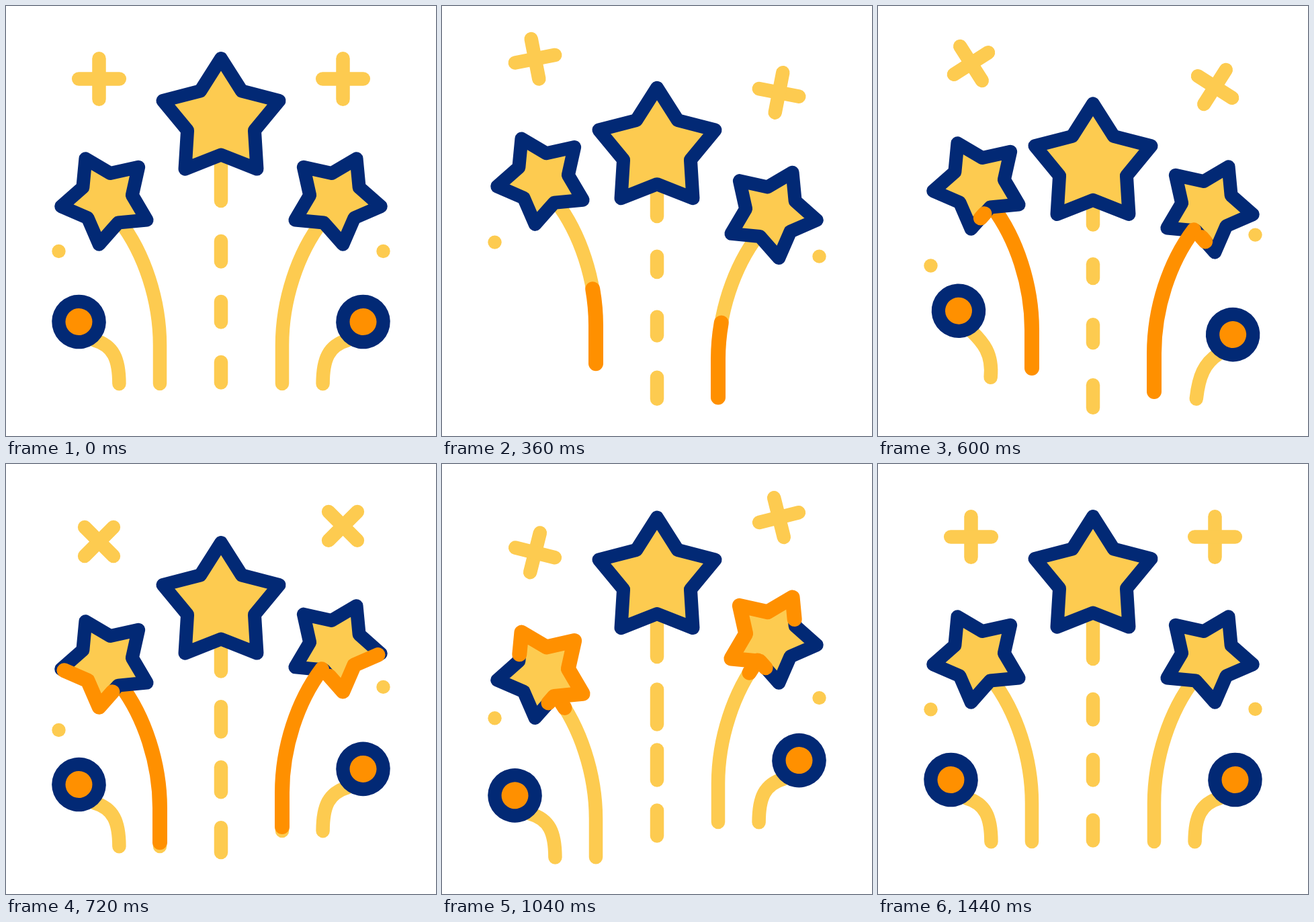
Recreate the animation shown at these times as an HTML page with a canvas. Size 640 px wide and 640 px high, loop 1.48 s.

```html
<!DOCTYPE html>
<html lang="en">
<head>
<meta charset="utf-8">
<title>Fireworks</title>
<style>
  html, body { margin: 0; height: 100%; overflow: hidden; background: #fff; }
  canvas { display: block; width: 100vw; height: 100vh; }
</style>
</head>
<body>
<canvas id="stage" width="640" height="640"></canvas>
<script>
const ctx = document.getElementById('stage').getContext('2d');
const YELLOW = '#fdcb50', NAVY = '#022975', ORANGE = '#ff9000';
const LOOP = 1480, STEP = 40, START = 80, END = 1360;
const RAD = Math.PI / 180;

// Left half of the picture; the right half is mirrored with its own motion.
// A pose is a shift (x, y) plus a tail shape (angle, two bends).
const REST_TAIL = [57, 24, 20];
const left = {
  sway: [-38, 31.5], drift: [-14, 32, 16],
  exit: { x: -88.5, y: -39, tail: [14, 4, -5] },
  entry: { x: 34.5, y: 60, tail: [79, -11, 16] }
};
const right = {
  sway: [26, -39], drift: [8, -34, -20.5],
  exit: { x: -85.5, y: -40, tail: [10, 3, 5] },
  entry: { x: 10, y: 64, tail: [67, 0, 0] },
  stemOnTop: true
};

const clamp = x => Math.min(1, Math.max(0, x));
const mix = (a, b, k) => a.map((v, i) => v + (b[i] - v) * k);

function ease(t, from, to) {
  const x = clamp((t - from) / (to - from));
  return x * x * (3 - 2 * x);
}

// Eases from 0 through the values, reaching each at its time, and back to 0.
function through(t, values, times) {
  let sum = 0, previous = 0, from = START;
  times.forEach((to, i) => {
    const next = values[i] ?? 0;
    sum += (next - previous) * ease(t, from, to);
    previous = next;
    from = to;
  });
  return sum;
}
const columnShift = (t, ...values) => through(t, values, [560, 880, 1200, 1440]);

// Vertex k of a five-pointed star: even ones are tips.
function starPoint(x, y, radius, turn, k) {
  const r = k % 2 ? radius * 0.577 : radius, angle = (turn + 36 * k) * RAD;
  return [x + r * Math.sin(angle), y - r * Math.cos(angle)];
}

function polygon(points) {
  const path = new Path2D();
  points.forEach(p => path.lineTo(...p));
  path.closePath();
  return path;
}

const bigStar = polygon(Array.from({ length: 10 }, (_, k) => starPoint(320, 169, 91, 0, k)));

// The outline starts where the stem meets it and runs clockwise.
const corners = Array.from({ length: 11 }, (_, k) => starPoint(149.2, 287.7, 67.8, -27, k + 5));
const smallStar = polygon([mix(corners[0], corners[1], 0.3), ...corners.slice(1)]);
const starLength = 10 * Math.hypot(corners[1][0] - corners[0][0], corners[1][1] - corners[0][1]);

const stem = new Path2D('M229 562V505C229 438 206 368 169 320');
const stemLength = 253;

function stroke(path, color, width = 20.5) {
  ctx.strokeStyle = color;
  ctx.lineWidth = width;
  ctx.stroke(path);
}

function line(x1, y1, x2, y2) {
  stroke(new Path2D(`M${x1} ${y1}L${x2} ${y2}`), YELLOW);
}

function disc(x, y, r, color) {
  ctx.fillStyle = color;
  ctx.beginPath();
  ctx.arc(x, y, r, 0, 7);
  ctx.fill();
}

function drawStar(path) {
  ctx.fillStyle = YELLOW;
  ctx.fill(path);
  stroke(path, NAVY, 20);
}

function spark(path, length, start, end) {
  if (end <= start) return;
  ctx.setLineDash([(end - start) * length, 2000]);
  ctx.lineDashOffset = -start * length;
  stroke(path, ORANGE, 22);
  ctx.setLineDash([]);
}

function drawColumn(t) {
  line(320, 200, 320, 290 + columnShift(t, 37, 0, -6));
  for (let i = 1; i <= 3; i++) {
    const top = 260 + 90 * i;
    line(320, top + columnShift(t, 36.5, -14, -15),
         320, top + 30.5 + columnShift(t, 18 + 7 * i, 18.5 - 7.5 * i, 9.5 - 6.5 * i));
  }
  ctx.save();
  ctx.translate(0, columnShift(t, 70, 8, -5));
  drawStar(bigStar);
  ctx.restore();
}

// Flies off sideways, then comes back from below.
function drawComet(t, side) {
  const leaving = t < 400;
  const pose = leaving ? side.exit : side.entry;
  const u = Math.max(0, leaving ? (t - START) / 160 : (640 - t) / 120);
  const [angle, bend1, bend2] = mix(REST_TAIL, pose.tail, clamp(u));
  ctx.save();
  ctx.translate(108.5 + pose.x * (leaving ? u * u : u), 470 + pose.y * u * u);
  ctx.rotate(angle * RAD);
  stroke(new Path2D(`M35 -4C58 ${-bend1} 79 ${-bend2} 110 0`), YELLOW);
  disc(0, 0, 40.3, NAVY);
  disc(0, 0, 20, ORANGE);
  ctx.restore();
}

function drawSide(t, side) {
  disc(78.5, 365 + through(t, side.drift, [400, 690, 880, LOOP]), 10.2, YELLOW);
  ctx.save();
  ctx.translate(0, through(t, side.sway, [480, 880, END]));

  const stemSpark = () => spark(stem, stemLength, ease(t, 680, 1120), ease(t, 190, 560));
  stroke(stem, YELLOW);
  if (!side.stemOnTop) stemSpark();
  drawStar(smallStar);
  if (side.stemOnTop) stemSpark();
  spark(smallStar, starLength, ease(t, 800, END), ease(t, 560, 1040));

  drawComet(t, side);

  ctx.translate(138.5, 108.5);
  ctx.rotate(-90 * RAD * ease(t, START, END));
  line(-30.3, 0, 30.3, 0);
  line(0, -30.3, 0, 30.3);
  ctx.restore();
}

ctx.lineCap = ctx.lineJoin = 'round';

function frame(now) {
  const t = Math.floor((now % LOOP) / STEP) * STEP;
  ctx.clearRect(0, 0, 640, 640);
  drawColumn(t);
  drawSide(t, left);
  ctx.save();
  ctx.translate(640, 0);
  ctx.scale(-1, 1);
  drawSide(t, right);
  ctx.restore();
  requestAnimationFrame(frame);
}
frame(performance.now());
</script>
</body>
</html>
```
